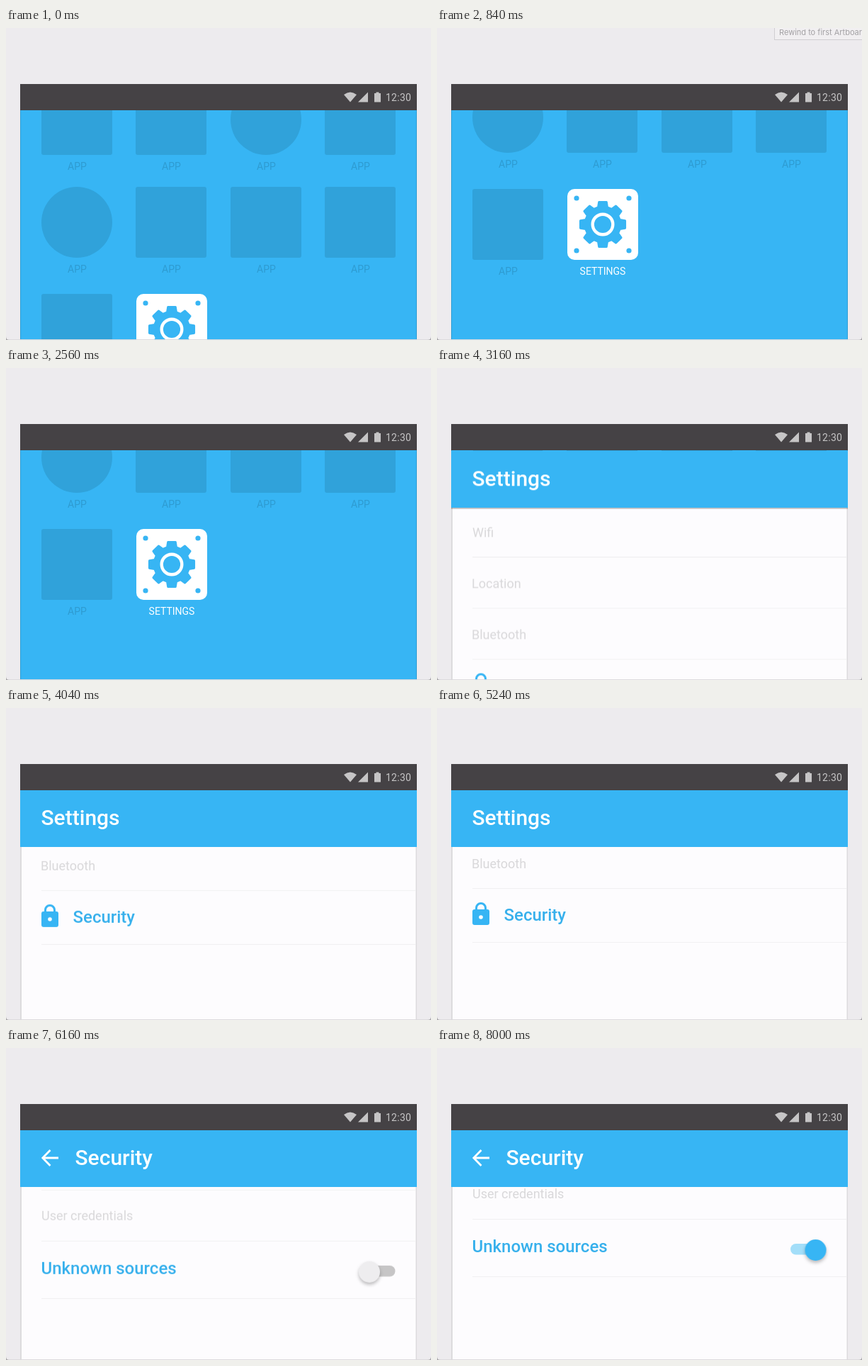
An HTML page that plays this animation: 600x440 px, repeating every 8.04 s.

```html
<!DOCTYPE html>
<html lang="en">
<head>
<meta charset="utf-8">
<title>Settings walkthrough</title>
<style>
  html, body { margin: 0; width: 100%; height: 100%; overflow: hidden; background: #edebee; }
  svg { display: block; width: 600px; height: 440px; font-family: Roboto, Arial, sans-serif; }
  .tile { fill: #30a2da; }
  .app { fill: #2e9bd1; font-size: 14px; text-anchor: middle; }
  .blue { fill: #37b5f4; }
  .paper { fill: #fdfcfe; }
  .title { fill: #fff; font-size: 30px; font-weight: 500; }
  .row { fill: #d9d8da; font-size: 18px; }
  .strong { fill: #37b0ec; font-size: 24px; font-weight: 500; }
  .rule { fill: #f1f0f2; }
  .edge { fill: #000; opacity: .13; }
  .status { fill: #c6c5c6; }
  #knob { filter: drop-shadow(0 3px 2.5px rgba(0, 0, 0, .26)); }
</style>
</head>
<body>
<svg viewBox="0 0 600 440">
  <defs><clipPath id="screen"><rect x="20" y="116" width="560" height="324"/></clipPath></defs>
  <rect width="600" height="440" fill="#edebee"/>

  <g clip-path="url(#screen)">
    <rect class="blue" x="20" y="116" width="560" height="324"/>
    <g id="grid">
      <g id="tiles"></g>
      <g transform="translate(234 425)">
        <rect x="-50" y="-50" width="100" height="100" rx="10" fill="#fff"/>
        <g class="blue">
          <circle cx="-37" cy="-37" r="3.6"/><circle cx="37" cy="-37" r="3.6"/>
          <circle cx="-37" cy="37" r="3.6"/><circle cx="37" cy="37" r="3.6"/>
          <path id="gear" stroke="#37b5f4" stroke-width="3" stroke-linejoin="round"/>
        </g>
        <circle r="14.3" fill="none" stroke="#fff" stroke-width="4.4"/>
        <text y="71" fill="#fff" font-size="14" text-anchor="middle">SETTINGS</text>
      </g>
    </g>
    <rect class="edge" x="20" y="116" width="1" height="324"/>
    <rect class="edge" x="579" y="116" width="1" height="324"/>

    <g id="settings">
      <rect class="paper" x="20" y="116" width="560" height="324"/>
      <g id="settingsList">
        <text class="row" x="50" y="236.5">Wifi</text>
        <text class="row" x="49" y="308.5">Location</text>
        <text class="row" x="49" y="380.5">Bluetooth</text>
        <g transform="translate(0 155)">
          <path d="M55.5 286V282a6.5 6.5 0 0 1 13 0V286" fill="none" stroke="#37b5f4" stroke-width="3"/>
          <rect class="blue" x="50" y="284" width="24" height="22" rx="3"/>
          <circle cx="62" cy="295" r="2.8" fill="#fff"/>
          <text class="strong" x="94.5" y="300">Security</text>
        </g>
      </g>
      <rect class="edge" x="20" y="116" width="2" height="324"/>
      <rect class="edge" x="578.5" y="116" width="1.5" height="324"/>
      <rect id="shade" x="20" y="196" width="560" height="1.5" fill="#000" opacity=".25"/>
      <rect class="blue" x="20" y="116" width="560" height="80"/>
      <text class="title" x="49.5" y="164.5">Settings</text>
    </g>

    <g id="security">
      <rect class="paper" x="20" y="116" width="560" height="324"/>
      <g id="securityList">
        <text class="row" x="50" y="236">Screen lock</text>
        <text class="row" x="50" y="308">User credentials</text>
        <text class="strong" x="49.5" y="383.5">Unknown sources</text>
        <rect id="track" x="499" y="372" width="50.5" height="15.5" rx="7.75"/>
        <circle id="knob" cx="513" cy="381" r="15"/>
      </g>
      <rect class="edge" x="20" y="116" width="2" height="324"/>
      <rect class="edge" x="578.5" y="116" width="1.5" height="324"/>
      <rect class="blue" x="20" y="116" width="560" height="80"/>
      <path d="M74 155H53M62.5 144L51.8 155L62.5 166" fill="none" stroke="#fff" stroke-width="2.8"/>
      <text class="title" x="97.5" y="164.5">Security</text>
    </g>
  </g>

  <rect x="20" y="79" width="560" height="37" fill="#454245"/>
  <g class="status">
    <path d="M477 94Q486 87 495 94L486 104.5Z"/>
    <path d="M497 104.5H511V90.5Z"/>
    <path d="M520 92h2.5v-1.5h4V92h2.5v12.5h-9Z"/>
    <text x="536" y="102.5" font-size="14" letter-spacing=".25">12:30</text>
  </g>

  <g id="tip">
    <rect x="476.5" y="-6.5" width="150" height="23" fill="#f1eff1" stroke="#d0ced1"/>
    <text x="483" y="10" font-size="11" fill="#a3a1a4" style="font-family: Inter, Arial, sans-serif">Rewind to first Artboard</text>
  </g>

  <rect y="439" width="600" height="1" fill="#dcdadd"/>
  <path d="M0 435Q0 440 5 440H0ZM600 435Q600 440 595 440H600Z" fill="#a9a7aa"/>
</svg>

<script>
const LOOP = 8040;
const EASE = 'cubic-bezier(.4, 0, .2, 1)';
const $ = id => document.getElementById(id);

function add(parent, tag, attrs, text) {
  const el = document.createElementNS('http://www.w3.org/2000/svg', tag);
  for (const key in attrs) el.setAttribute(key, attrs[key]);
  if (text) el.textContent = text;
  parent.append(el);
}

// Home screen: s = square, c = circle
const columns = [50, 183, 317, 450];
const rows = [[79, 'sscs'], [224, 'csss'], [375, 's']];
for (const [y, shapes] of rows) {
  [...shapes].forEach((shape, i) => {
    const x = columns[i];
    add($('tiles'), 'rect', { class: 'tile', x, y, width: 100, height: 100, rx: shape === 'c' ? 50 : 3 });
    add($('tiles'), 'text', { class: 'app', x: x + 50.5, y: y + 121 }, 'APP');
  });
}

// Gear with eight tapered teeth
const gear = [];
for (let k = 0; k < 8; k++) {
  for (const [radius, turn] of [[25, -15], [32, -9.5], [32, 9.5], [25, 15]]) {
    const a = (k * 45 + turn) * Math.PI / 180;
    gear.push((radius * Math.cos(a)).toFixed(2) + ' ' + (radius * Math.sin(a)).toFixed(2));
  }
}
$('gear').setAttribute('d', 'M' + gear.join('L') + 'Z');

function rules(list, ys) {
  for (const y of ys) add(list, 'rect', { class: 'rule', x: 50, y: y - .5, width: 528, height: 1 });
}
rules($('settingsList'), [265.5, 337.5, 409.5, 485.5]);
rules($('securityList'), [265.5, 337.5, 418.5]);

// Each step: element, property, start ms, end ms, from, to
const up = y => `translateY(${y}px)`;
const steps = [
  ['grid', 'transform', 200, 820, up(0), up(-148)],
  ['settings', 'transform', 2640, 3210, up(324), up(0)],
  ['shade', 'opacity', 3210, 3450, .25, 0],
  ['settingsList', 'transform', 3480, 4160, up(0), up(-155)],
  ['security', 'transform', 5320, 5890, up(324), up(0)],
  ['securityList', 'transform', 5900, 6500, up(0), up(-96)],
  ['knob', 'transform', 7400, 7700, 'translateX(0px)', 'translateX(21.5px)'],
  ['knob', 'fill', 7400, 7700, '#eeedef', '#37b5f4'],
  ['track', 'fill', 7400, 7700, '#c6c5c6', '#a3def9']
];

const start = document.timeline.currentTime ?? performance.now();

function play(id, prop, points) {
  const frames = points.map(([ms, value]) => ({ offset: ms / LOOP, [prop]: value, easing: EASE }));
  $(id).animate(frames, { duration: LOOP, iterations: Infinity }).startTime = start;
}

for (const [id, prop, begin, end, from, to] of steps) {
  play(id, prop, [[0, from], [begin, from], [end, to], [LOOP, to]]);
}
play('tip', 'opacity', [[0, 0], [600, 0], [600, 1], [1400, 1], [1600, 0], [LOOP, 0]]);
</script>
</body>
</html>
```
